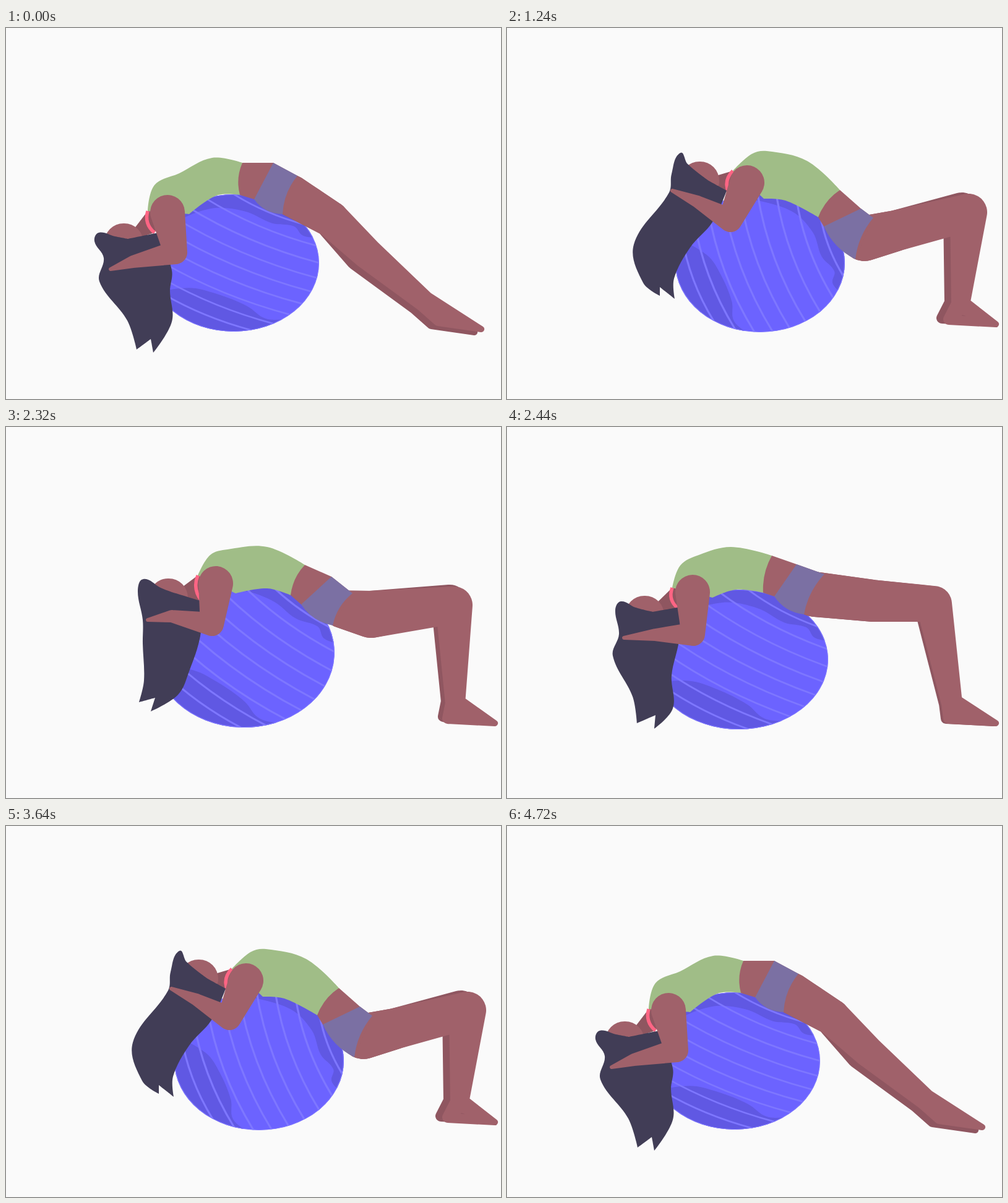
These frames come from a looping animation (800x600 px, 5.6 s). An HTML page:

```html
<!DOCTYPE html>
<html lang="en">
<head>
<meta charset="utf-8">
<title>Ball stretch</title>
<style>
  html, body { margin: 0; width: 100%; height: 100%; overflow: hidden; background: #fafafa; }
  svg { display: block; width: 800px; height: 600px; }
</style>
</head>
<body>
<svg viewBox="0 0 800 600">
  <clipPath id="round"><circle r="138"/></clipPath>
  <g id="ball" clip-path="url(#round)"><circle r="138" fill="#6c63ff"/></g>
  <g id="body"></g>
</svg>
<script>
const NS = 'http://www.w3.org/2000/svg';
const SKIN = '#a0616a', SHADE = '#8f5660', STRIPE = '#7e77ff', DARK = '#6058e3';

const pts = s => s.split(' ').map(p => p.split(',').map(Number));
const mix = (a, b, u) => Array.isArray(a) ? a.map((v, i) => mix(v, b[i], u)) : a + (b - a) * u;
const dist = (p, q) => Math.hypot(q[0] - p[0], q[1] - p[1]);

// Each pose is a rig of joints and seams:
// seams = top hem, waistband, leg cuff (upper and lower end of each)
// torso = three points along the back, belly, armpit; collar = ends of the choker
// arm = shoulder, elbow, wrist, fingers; leg = thigh, knee, ankle, heel, toe with radii
// far = shift of the far leg; ball = centre, radii, turn
const FOOT = '714,471,9 790,479,5';
const arch = {
  seams: pts('382,218 378,270 432,218 401,277 471,239 447,301'),
  torso: pts('240,254 280,235 333,210 340,271 296,301'),
  collar: pts('229,296 240,331'), head: [190, 347],
  arm: pts('261,298 274,363 205,378 169,390'),
  leg: pts('525,309,29 583,364,25 676,442,17 699,473,9 768,487,5'), far: [-11, 5],
  hair: pts('143,345 150,331 176,337 197,341 246,331 268,392 265,425 268,475 238,525 234,503 211,520 196,473 151,410 158,372'),
  ball: [368, 380, 138, 111, 0]
};
const bridge = {
  seams: pts('428,208 414,268 468,222 432,274 513,238 480,303'),
  torso: pts('280,224 310,207 362,194 370,263 332,276'),
  collar: pts('267,260 276,293'), head: [222, 304],
  arm: pts('300,267 301,335 240,336 189,341'),
  leg: pts('590,281,34 690,286,29 719,447,17 ' + FOOT), far: [-4, 0],
  hair: pts('175,296 184,282 208,292 236,299 280,291 278,345 266,402 268,455 238,488 240,466 210,479 203,436 171,370 181,335'),
  ball: [375, 376, 144, 113, 6]
};
const low = {
  seams: pts('483,223 460,272 526,242 477,287 560,269 528,321'),
  torso: pts('330,207 358,198 422,194 422,261 371,269'),
  collar: pts('310,240 316,281'), head: [262, 276],
  arm: pts('339,253 333,319 268,306 229,312'),
  leg: pts('590,303,38 724,288,30 726,447,16 ' + FOOT), far: [-7, -3],
  hair: pts('213,265 222,246 250,260 268,267 317,282 314,338 296,395 278,433 234,460 241,438 215,445 223,410 221,350 221,312'),
  ball: [385, 365, 146, 121, 14]
};
const peak = {
  seams: pts('538,262 503,306 572,292 512,321 592,307 563,374'),
  torso: pts('395,204 420,199 485,215 450,279 415,276'),
  collar: pts('365,231 358,266'), head: [311, 247],
  arm: pts('388,250 361,311 308,281 267,263'),
  leg: pts('628,328,33 746,298,30 733,447,15 ' + FOOT), far: [-11, -2],
  hair: pts('266,236 280,202 292,220 326,247 355,263 332,314 296,355 270,405 271,438 247,419 247,433 220,412 205,350 262,266'),
  ball: [409, 380, 137, 112, 45]
};
// On the first lift the ball turns ahead of the body.
const rise = { ...bridge, ball: [393, 372, 143, 123, 29] };
const lift = { ...low, ball: mix(rise.ball, peak.ball, 0.5) };

// The loose strands swing ahead of the body.
function blend(a, b, u) {
  const pose = {};
  for (const k in a) pose[k] = mix(a[k], b[k], u);
  const lead = Math.min(1, u * 1.55);
  pose.hair = a.hair.map((p, i) => mix(p, b.hair[i], i > 5 && i < 13 ? lead : u));
  return pose;
}

// Smooth line through points; indices in sharp become corners.
function spline(p, sharp = [], closed = true) {
  const n = p.length;
  const at = i => p[closed ? (i + n) % n : Math.max(0, Math.min(n - 1, i))];
  const handle = (i, len) => {
    if (sharp.includes((i + n) % n)) return at(i);
    const k = len / dist(at(i - 1), at(i + 1));
    return at(i).map((v, j) => v + (at(i + 1)[j] - at(i - 1)[j]) * k);
  };
  let d = `M${p[0]}`;
  for (let i = 0; i < n - !closed; i++) {
    const len = dist(at(i), at(i + 1)) * 0.35;
    d += `C${handle(i, len)} ${handle(i + 1, -len)} ${at(i + 1)}`;
  }
  return d;
}

// Curve from p to q, pushed sideways by bow.
function bend(p, q, bow) {
  const k = bow / dist(p, q);
  return `Q${(p[0] + q[0]) / 2 - (q[1] - p[1]) * k},${(p[1] + q[1]) / 2 + (q[0] - p[0]) * k} ${q}`;
}

// Outline around two circles.
function cone([x1, y1, r1], [x2, y2, r2]) {
  const dir = Math.atan2(y2 - y1, x2 - x1);
  const open = Math.acos((r1 - r2) / Math.hypot(x2 - x1, y2 - y1));
  const rim = (x, y, r, a) => `${x + r * Math.cos(a)},${y + r * Math.sin(a)}`;
  const big = open < Math.PI / 2 ? 1 : 0;
  return `M${rim(x1, y1, r1, dir + open)}A${r1},${r1} 0 ${big} 1 ${rim(x1, y1, r1, dir - open)}` +
    `L${rim(x2, y2, r2, dir - open)}A${r2},${r2} 0 ${1 - big} 1 ${rim(x2, y2, r2, dir + open)}Z`;
}
const limb = joints => joints.slice(1).map((q, i) => cone(joints[i], q)).join('');

function legPath({ seams, leg }, [dx, dy]) {
  const [a, b] = seams.slice(4);
  const hip = [...mix(a, b, 0.5), dist(a, b) / 2];
  const joints = [hip, leg[0], ...leg.slice(1).map(([x, y, r]) => [x + dx, y + dy, r])];
  return limb(joints) + cone(joints[3], joints[5]);
}

const ARM_RADII = [28, 19, 10, 3];
const LAYERS = [
  [{ fill: SHADE }, p => legPath(p, p.far)],
  [{ fill: SKIN }, p => legPath(p, [0, 0])],
  [{ fill: '#a0bd87' }, ({ collar, torso, seams, arm }) =>
    spline([collar[0], ...torso.slice(0, 3), seams[0], seams[1], torso[3], torso[4], arm[0]], [0, 4, 5, 7, 8])],
  [{ fill: SKIN }, ({ seams: [e, f, c, d, a, b] }) => `M${c}L${e}${bend(e, f, 9)}L${d}L${b}L${a}Z`],
  [{ fill: '#7b70a3' }, ({ seams: [, , c, d, a, b] }) => `M${c}L${a}${bend(a, b, 11)}${bend(b, d, -13)}Z`],
  [{ fill: SHADE }, ({ head, collar, arm }) => `M${head}L${collar[0]}L${arm[0]}L${collar[1]}Z`],
  [{ fill: SKIN }, ({ head: [x, y] }) => cone([x, y, 31], [x + 1, y, 31])],
  [{ fill: 'none', stroke: '#ff6584', 'stroke-width': 5.5 }, ({ collar: [s, k] }) => `M${s}${bend(s, k, 12)}`],
  [{ fill: '#413d56' }, p => spline(p.hair, [3, 4, 8, 9, 10])],
  [{ fill: SKIN }, p => limb(p.arm.map((j, i) => [...j, ARM_RADII[i]]))]
];

function add(parent, attrs) {
  const el = document.createElementNS(NS, 'path');
  for (const k in attrs) el.setAttribute(k, attrs[k]);
  return parent.appendChild(el);
}

const ball = document.getElementById('ball');
const wave = s => spline(pts(s), [], false);
add(ball, { fill: DARK, d: wave('-110,-75 -38,-109 17,-104 62,-80 97,-74 112,-55 140,-50') + 'V-150H-150Z' });
add(ball, { fill: DARK, d: wave('-140,62 -73,50 -28,62 22,87 52,112 90,113') + 'V150H-150Z' });
for (let k = 0; k < 9; k++) {
  const v = -122 + 28.5 * k, h = Math.sqrt(138 ** 2 - v * v);
  add(ball, {
    d: `M${-h},${v}Q0,${v + h * 0.17} ${h},${v}`, transform: 'rotate(28)',
    fill: 'none', stroke: STRIPE, 'stroke-width': 3.2
  });
}
add(ball, { d: cone([0, 0, 138], [0.01, 0, 138]), fill: 'none', stroke: STRIPE, 'stroke-width': 2.5 });

const body = document.getElementById('body');
const parts = LAYERS.map(([attrs, path]) => [add(body, attrs), path]);

const half = blend(low, peak, 0.33), high = blend(low, peak, 0.65);
const STEPS = [
  [0, arch], [880, rise], [1000, lift], [1120, blend(lift, peak, 0.65)],
  [1240, peak], [2080, high], [2200, half], [2320, low],
  [2440, bridge], [3280, low], [3400, half], [3520, high],
  [3640, peak], [4480, low], [4600, bridge], [4720, arch]
];

let shown;
function draw(t) {
  const pose = STEPS.findLast(s => s[0] <= t)[1];
  if (pose === shown) return;
  shown = pose;
  const [x, y, a, b, turn] = pose.ball;
  ball.setAttribute('transform', `translate(${x} ${y}) scale(${a / 138} ${b / 138}) rotate(${turn})`);
  for (const [el, path] of parts) el.setAttribute('d', path(pose));
}
const start = performance.now();
function tick() {
  draw((performance.now() - start) % 5600);
  requestAnimationFrame(tick);
}
tick();
</script>
</body>
</html>
```
